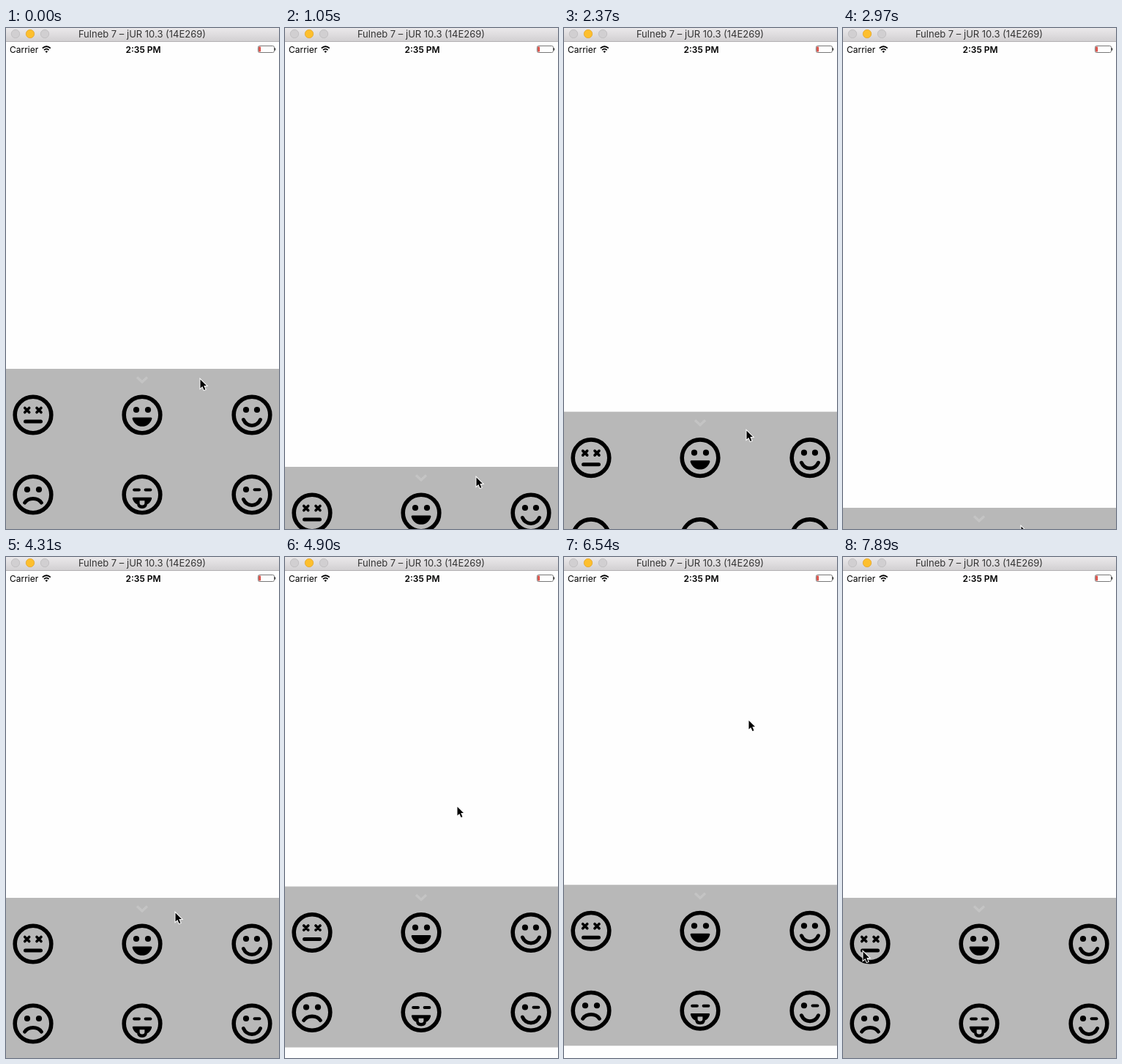
An HTML page for the animation above (8000 ms loop, 373 px wide and 685 px high).

```html
<!DOCTYPE html>
<html lang="en">
<head>
<meta charset="utf-8">
<title>Emoji drawer</title>
<style>
  html, body { margin: 0; width: 100%; height: 100%; overflow: hidden; background: #fefefe; }
  svg { display: block; width: 373px; height: 685px; }
  text { font-family: Inter, Roboto, sans-serif; font-size: 12px; }
  .title { font-size: 13px; fill: #333; }
  .line { fill: none; stroke: #000; stroke-linecap: round; stroke-linejoin: round; }
</style>
</head>
<body>
<svg viewBox="0 0 373 685">
  <defs>
    <linearGradient id="bar" x2="0" y2="1">
      <stop stop-color="#ebe9eb"/>
      <stop offset="1" stop-color="#d2d0d2"/>
    </linearGradient>
    <circle id="ring" class="line" r="24.8" stroke-width="5.6"/>
    <circle id="eye" r="4.1"/>
    <path id="cross" class="line" d="M-3-3 3 3M3-3-3 3" stroke-width="3.6"/>
    <path id="dash" class="line" d="M-3.4 0H3.4" stroke-width="4"/>
    <path id="smile" class="line" d="M-11.5 6.6C-7 17 7 17 11.5 6.6" stroke-width="5"/>
    <path id="grin" d="M-12 3.5H12Q13.8 3.5 13.3 5.5C11 12.5 6 15.8 0 15.8S-11 12.5-13.3 5.5Q-13.8 3.5-12 3.5Z"/>
  </defs>

  <rect width="373" height="685" fill="#fefefe"/>

  <g id="panel">
    <rect width="373" height="220" fill="#b8b8b8"/>
    <path d="M179 11.5 186 18 193 11.5" fill="none" stroke="#c4c4c4" stroke-width="3.4"/>
    <g transform="translate(37 63)">
      <use href="#ring"/>
      <use href="#cross" x="-8.3" y="-6.5"/><use href="#cross" x="8" y="-6.5"/>
      <path class="line" d="M-10.5 9H10.5" stroke-width="5"/>
    </g>
    <g transform="translate(186 63)">
      <use href="#ring"/>
      <use href="#eye" x="-8" y="-7"/><use href="#eye" x="8" y="-7"/>
      <use href="#grin"/>
    </g>
    <g transform="translate(336 63)">
      <use href="#ring"/>
      <use href="#eye" x="-8" y="-7"/><use href="#eye" x="7" y="-7"/>
      <use href="#smile"/>
    </g>
    <g transform="translate(37 172)">
      <use href="#ring"/>
      <use href="#eye" x="-8" y="-7"/><use href="#eye" x="8" y="-7"/>
      <path class="line" d="M-11.3 11C-6.5 3.5 6.5 3.5 11.3 11" stroke-width="5"/>
    </g>
    <g transform="translate(186 172)">
      <use href="#ring"/>
      <use href="#dash" x="-7.5" y="-6.6"/><use href="#dash" x="8" y="-6.6"/>
      <path d="M-12 3.8H12Q13.8 3.8 13 6C11.5 10 9.5 12 7 13.3V12Q7 19 0 19T-7 12V13.3C-9.5 12-11.5 10-13 6Q-13.8 3.8-12 3.8Z"/>
      <path d="M-3.4 8.3H3.4V11.5Q3.4 14.5 0 14.5T-3.4 11.5Z" fill="#b8b8b8"/>
    </g>
    <g transform="translate(336 172)">
      <use href="#ring"/>
      <use href="#eye" x="-8" y="-7"/><use href="#dash" x="7" y="-6.8"/>
      <use href="#smile"/>
    </g>
  </g>

  <rect width="373" height="18" fill="url(#bar)"/>
  <rect y="18" width="373" height="1" fill="#b3b1b3"/>
  <g fill="#d1cfd1" stroke="#bdbbbd" stroke-width=".8">
    <circle cx="13" cy="8" r="5.7"/>
    <circle cx="33" cy="8" r="5.7" fill="#fdbf2d" stroke="#e2a52c"/>
    <circle cx="53" cy="8" r="5.7"/>
  </g>
  <text class="title" x="186" y="13" text-anchor="middle">Fulneb 7 – jUR 10.3 (14E269)</text>

  <text x="5" y="33.5">Carrier</text>
  <g fill="none" stroke="#000" stroke-width="1.8">
    <path d="M49.8 27.7Q55.3 22.8 60.8 27.7M52 30.1Q55.3 27.2 58.6 30.1"/>
    <path d="M55.3 34 53.5 32Q55.3 30.6 57.1 32Z" fill="#000" stroke="none"/>
  </g>
  <text x="187.5" y="33.5" text-anchor="middle" font-weight="600">2:35 PM</text>
  <rect x="344.5" y="24.5" width="22" height="9" rx="2" fill="none" stroke="#777"/>
  <path d="M367.3 27.3Q369 29 367.3 30.8Z" fill="#222" stroke="#222" stroke-width=".6"/>
  <rect x="345.3" y="25.4" width="2.7" height="7.2" rx=".8" fill="#d9483f"/>

  <path id="cursor" d="M.5 1.5V13.5L3.3 10.9 5.5 16 7.5 15.2 5.3 10.1H9Z"
    stroke="#fff" stroke-width="2" paint-order="stroke"/>
</svg>
<script>
const LOOP = 8000;
const TICK = 148.5; // the screen updates once per tick
const OPEN = 466, CLOSED = 656;
const HOME = [265, 479];

// Pointer moves, timed in ticks; those with a rest position drag the panel
const moves = [
  { from: 4, to: 8, at: [260, 636], rest: OPEN },
  { from: 10, to: 12, at: [252, 490] },
  { from: 12, to: 20, at: [243, 680], rest: CLOSED },
  { from: 21, to: 22, at: [229, 668] },
  { from: 23, to: 27, at: [231, 485], rest: OPEN },
  { from: 31, to: 35, at: [239, 194], rest: OPEN },
  { from: 36, to: 38, at: [245, 480] },
  { from: 38, to: 44, at: [252, 222], rest: OPEN },
  { from: 44, to: 46, at: [200, 500] },
  { from: 46, to: 48, at: [38, 515] },
  { from: 50, to: 53, at: [27, 538] }
];

const ease = f => (1 - Math.cos(Math.PI * f)) / 2;
const spring = s => Math.exp(-2.86 * s) * Math.cos(Math.PI * s);
// Above the open position the panel resists the drag
const resist = y => y < OPEN ? OPEN - 18.5 * (1 - Math.exp((y - OPEN) / 80)) : y;

function pose(tick) {
  let tip = HOME, top = OPEN;
  for (const { from, to, at, rest } of moves) {
    if (tick < from) break;
    const f = ease(Math.min(1, (tick - from) / (to - from)));
    const next = tip.map((v, i) => v + (at[i] - v) * f);
    if (rest) {
      top = resist(top + next[1] - tip[1]);
      if (tick > to) top = rest + (top - rest) * spring(tick - to);
    }
    tip = next;
  }
  return { tip, top };
}

const panel = document.getElementById("panel");
const cursor = document.getElementById("cursor");
const place = (el, x, y) => el.setAttribute("transform", `translate(${x} ${y})`);

function draw(ms) {
  const { tip, top } = pose(Math.floor(ms % LOOP / TICK));
  place(panel, 0, top);
  place(cursor, ...tip.map(Math.round));
}

const start = performance.now();
function frame() {
  draw(performance.now() - start);
  requestAnimationFrame(frame);
}
frame();
</script>
</body>
</html>
```
